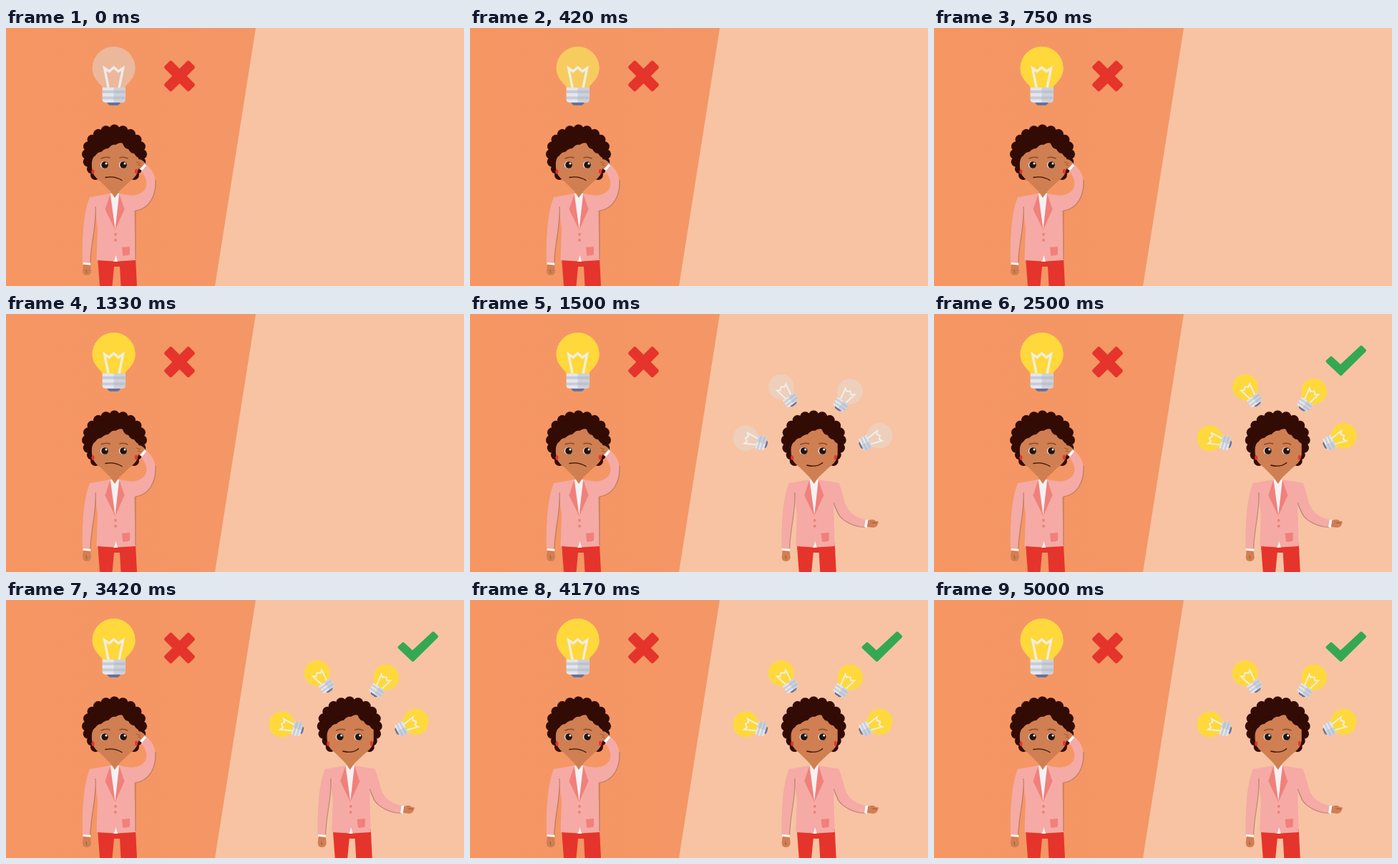
Write an HTML page that moves like this. It is 640x360 px and loops after 5080 ms.

```html
<!DOCTYPE html>
<html lang="en">
<head>
<meta charset="utf-8">
<title>Ideas</title>
<style>
  html, body { margin: 0; width: 100%; height: 100%; overflow: hidden; background: #f49765; }
  svg { display: block; width: 100vw; height: 100vh; }
  .skin { fill: #d07f52; }
  .pink { fill: #f5aaa5; }
  .trim { fill: #f0807a; }
  .red { fill: #e5342b; }
  .white { fill: #fff; }
  .shirt { fill: #f5f1f2; }
  .shade { fill: none; stroke: #9a6a5c; stroke-opacity: .65; stroke-width: 1.2; }
  .line { fill: none; stroke-linecap: round; stroke-linejoin: round; }
</style>
</head>
<body>
<svg viewBox="0 0 640 360" preserveAspectRatio="none">
  <defs>
    <linearGradient id="warm" x2="1" y2="0">
      <stop offset="0" stop-color="#f59663"/>
      <stop offset="1" stop-color="#f39768"/>
    </linearGradient>

    <g id="screw">
      <path d="M-16 27H16V44Q16 48 11 48H-11Q-16 48-16 44Z" fill="#e4e6ec"/>
      <path d="M0 27H16V44Q16 48 11 48H0Z" fill="#cdd1db"/>
      <path d="M-16 31H16V35H-16ZM-16 39.500H16V43.500H-16Z" fill="#aeb4c4" opacity=".5"/>
      <path d="M-9 48H9Q8 52 4 52H-4Q-8 52-9 48Z" fill="#67719f"/>
    </g>
    <path id="glass" d="M-16 27C-16 23-30 16-30 0A30 30 0 0 1 30 0C30 16 16 23 16 27Z"/>
    <path id="wire" fill="none" stroke="#f1f1ee" stroke-width="3.400" stroke-linejoin="miter"
      d="M-7.500 27L-13 0L-6.500 4.500L0-1L6.500 4.500L13 0L7.500 27"/>

    <g id="body">
      <path class="red" d="M128 320H181L183 360H160.500L159 333H151L148.500 360H131Z"/>
      <path class="shirt" d="M144 231H160L156 326H150Z"/>
      <path class="skin" d="M146 228H158L152 237Z"/>
      <path class="pink" d="M146 231L117 236C109 255 106 290 107 327L117.500 328C118 304 124 284 125 256L128 280L126.500 324L151 325.500L153.500 317L156 325.500L181 324L179 254L188 236L158 231L152.500 281Z"/>
      <path class="shade" d="M125 249C127 276 118.500 298 118 327"/>
      <path class="trim" d="M145.500 232L138.500 253L152.500 282ZM158.500 232L165.500 253L152.500 282Z"/>
      <circle class="trim" cx="153" cy="288" r="2"/>
      <circle class="trim" cx="153" cy="296" r="2"/>
      <path class="trim" d="M162 306L173 305V315Q173 317 171 317L165 318Q163 318 163 316Z"/>
      <path class="white" d="M107.500 327L118 328V331L107.500 330Z"/>
      <path class="skin" d="M108 330L118 331L119 340Q118 345 113 345Q107 345 107 339Z"/>
      <path d="M112 337L113 342" stroke="#9c5a33"/>
    </g>

    <g id="head">
      <g id="hair" fill="#330b05"></g>
      <path class="skin" d="M120 187Q121 180 125 178Q128 173 133 173Q138 168 143 168Q148 162 153 163Q159 159 163 161Q165 168 171 169Q174 175 179 175Q182 180 185 181L185 194C185 205 178 210 172 215L157 229Q152 234 147 229L132 214C124 208 119 203 120 187Z"/>
      <path class="line" stroke="#8b4b2b" stroke-width="1.500" d="M133 182Q139 179 145 181M159 181Q164 179 170 182"/>
      <g class="shirt">
        <circle cx="137" cy="191" r="5"/>
        <circle cx="163" cy="191" r="5"/>
      </g>
      <g fill="#1d1413">
        <circle cx="138" cy="191" r="4.800"/>
        <circle cx="164" cy="191" r="4.800"/>
      </g>
      <g class="white">
        <circle cx="140" cy="189" r="1.500"/>
        <circle cx="166" cy="189" r="1.500"/>
      </g>
      <g class="red">
        <ellipse cx="121.500" cy="200.500" rx="2" ry="3.200"/>
        <ellipse cx="182" cy="200" rx="2" ry="3.200"/>
      </g>
    </g>
  </defs>

  <path d="M0 0H640V360H0Z" fill="url(#warm)"/>
  <path d="M349 0H640V360H292Z" fill="#f7c3a3"/>

  <g id="puzzled">
    <g transform="translate(242.500 67)" class="red">
      <rect x="-24.500" y="-7.200" width="49" height="14.400" rx="2.800" transform="rotate(45)"/>
      <rect x="-24.500" y="-7.200" width="49" height="14.400" rx="2.800" transform="rotate(-45)"/>
    </g>
    <use href="#body"/>
    <path class="pink" d="M170 234C184 234 193 230 195.500 222C198 213 194 206 187.500 198L195 190C203 196 208 204 208.500 213C210 235 199 253 179 255Z"/>
    <path class="shade" d="M209 212C210 235 200 252 181 255V322"/>
    <use href="#head"/>
    <path class="skin" d="M181 184Q187 181 192 186L196 190L189 198Q184 197 182 192Z"/>
    <path d="M182 187L188 189M184 191L189 192" stroke="#9c5a33"/>
    <path d="M188.500 198L195 190.500" stroke="#fff" stroke-width="3.500"/>
    <path class="line" stroke="#3b1409" stroke-width="1.300" d="M139 208.500Q152 206 162 212.500"/>
  </g>

  <g id="inspired">
    <g transform="translate(328.700 0)">
      <path class="pink" d="M176 234L186 236C193 246 192 262 200 273C207 282 216 286 226 287L224 297C206 297 191 289 185 279L178 262Z"/>
      <path class="shade" d="M179 263L186 279C192 289 207 297 223 297.500"/>
      <use href="#body"/>
      <path class="white" d="M224 287L228 287.500L226 298L222.500 297Z"/>
      <path class="skin" d="M227.500 288Q233 286 236 287L238 289H241Q243 291 241 293Q240 298 234 298L226 297Z"/>
      <path d="M233 291L240 291.500" stroke="#9c5a33"/>
      <use href="#head"/>
      <path class="line" stroke="#3b1409" stroke-width="1.300" d="M142 211Q156 214.500 164 207.500"/>
    </g>
  </g>

  <path id="tick" fill="#34a853" stroke="#34a853" stroke-width="4" stroke-linejoin="round"
    d="M549.500 66L555 61L568 73L597 46L602 51L568.500 84Z"/>
</svg>
<script>
const LOOP = 5080;
const $ = id => document.getElementById(id);
const NS = "http://www.w3.org/2000/svg";

function add(parent, tag, attrs) {
  const el = document.createElementNS(NS, tag);
  for (const key in attrs) el.setAttribute(key, attrs[key]);
  return parent.appendChild(el);
}

// Curls: a ring of circles around a filled centre.
function curl(x, y, r) {
  add($("hair"), "circle", { cx: x, cy: y, r });
}
const CURLS = 14;
add($("hair"), "ellipse", { cx: 151.5, cy: 176, rx: 38, ry: 34 });
for (let i = 0; i <= CURLS; i++) {
  const a = (145 + i * 250 / CURLS) * Math.PI / 180;
  curl(151.5 + 38.5 * Math.cos(a), 176.5 + 35 * Math.sin(a), 7);
}
curl(125, 205, 7);
curl(179, 205, 7);

// Adds a bulb and returns its glowing layer.
function bulb(parent, x, y, scale, turn) {
  const g = add(parent, "g", { transform: `translate(${x} ${y}) rotate(${turn}) scale(${scale})` });
  add(g, "use", { href: "#glass", fill: "#e3dcd3", opacity: .5 });
  const glow = add(g, "use", { href: "#glass", fill: "#ffd83b" });
  add(g, "use", { href: "#wire", opacity: .9 });
  add(g, "use", { href: "#screw" });
  return glow;
}

const single = [bulb($("puzzled"), 150.6, 56, 1, 0)];
const several = [
  [385.5, 173.3, -73], [435, 102, -36], [531, 108, 35], [572.5, 170, 63]
].map(([x, y, turn]) => bulb($("inspired"), x, y, .6, turn));

// Each row: start time, brightness held until the next row.
const GLOW = [[0, 0], [415, .62], [498, .82], [580, 1]];
const glowAt = t => GLOW.reduce((v, [start, level]) => t >= start ? level : v, 0);
const light = (bulbs, t) => bulbs.forEach(b => b.setAttribute("opacity", glowAt(t)));
const show = (el, on) => el.setAttribute("visibility", on ? "visible" : "hidden");

const begin = performance.now();
function draw() {
  const t = (performance.now() - begin) % LOOP;
  light(single, t);
  light(several, t - 1500);
  show($("inspired"), t >= 1500);
  show($("tick"), t >= 2000);
  requestAnimationFrame(draw);
}
draw();
</script>
</body>
</html>
```
